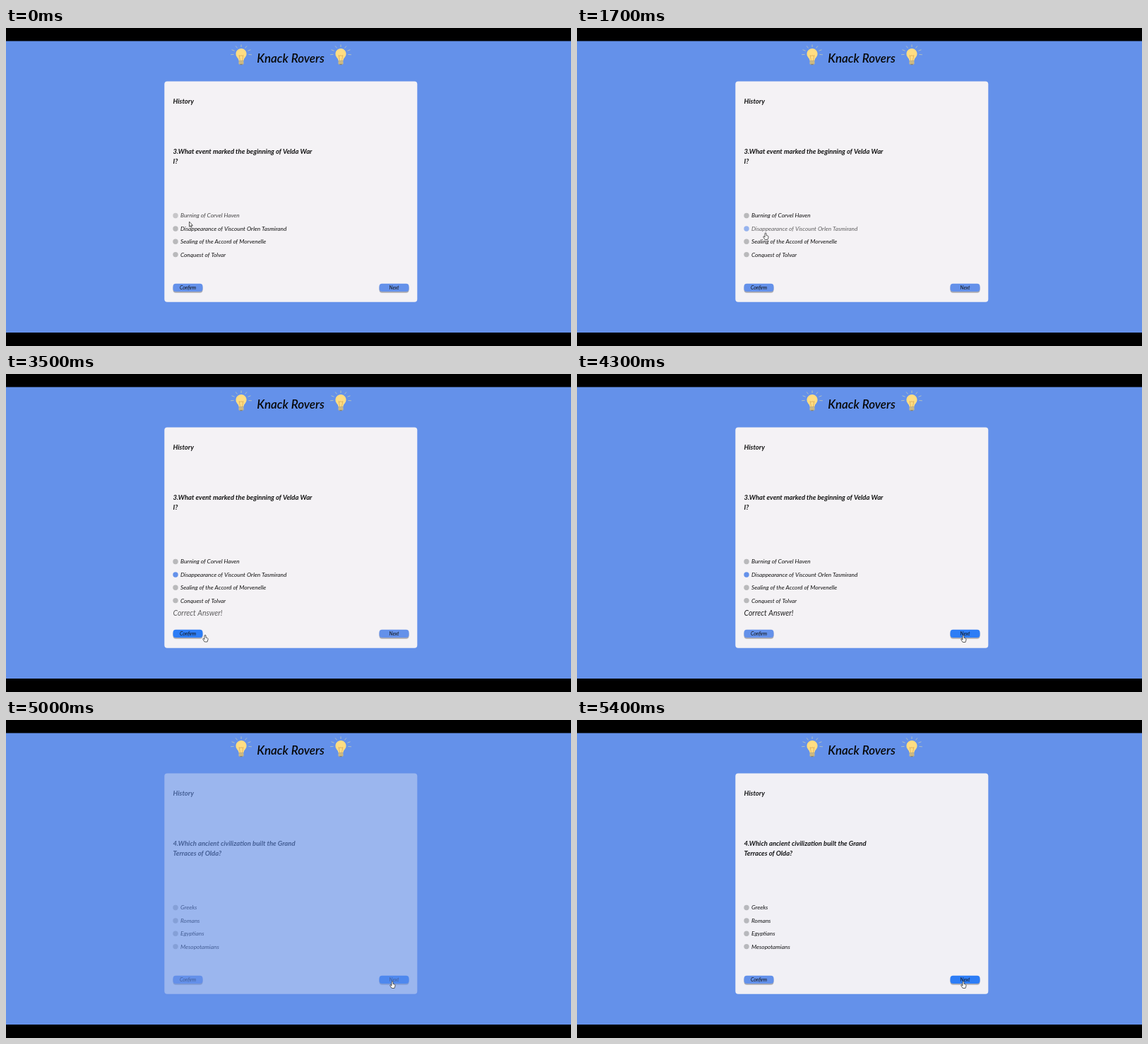
These frames come from a looping animation (800x450 px, 5.5 s). An HTML page with a canvas:

```html
<!DOCTYPE html>
<html lang="en">
<head>
<meta charset="utf-8">
<title>Quiz</title>
<style>
  html, body { margin: 0; width: 100%; height: 100%; overflow: hidden; background: #000; }
  canvas { display: block; width: 800px; height: 450px; }
</style>
</head>
<body>
<canvas id="stage"></canvas>
<script>
const LOOP = 5500;
const SWAP = 4550;
const SELECT = 1000;
const FACE = 'Lato, "Open Sans", sans-serif';
const BLUE = '#6491ea';
const BRIGHT = '#2d7df6';
const ROWS = [265.5, 284, 302.2, 320.6];

const QUESTIONS = [
  {
    lines: ['3.What event marked the beginning of Velda War', 'I?'],
    options: [
      'Burning of Corvel Haven',
      'Disappearance of Viscount Orlen Tasmirand',
      'Sealing of the Accord of Morvenelle',
      'Conquest of Tolvar'
    ]
  },
  {
    lines: ['4.Which ancient civilization built the Grand', 'Terraces of Olda?'],
    options: ['Greeks', 'Romans', 'Egyptians', 'Mesopotamians']
  }
];

const BUTTONS = [
  { label: 'Confirm', x: 236.5, press: [2740, 2900] },
  { label: 'Next', x: 528.5, press: [4430, SWAP] }
];

// Pointer stops: time, x, y
const PATH = [
  [0, 259.5, 274],
  [900, 267, 289.5],
  [1700, 267, 289.5],
  [2700, 264, 370.5],
  [3100, 264, 370.5],
  [3500, 282, 369],
  [4250, 547, 369.5],
  [LOOP, 547, 369.5]
];

const canvas = document.getElementById('stage');
const ctx = canvas.getContext('2d');
const ratio = window.devicePixelRatio || 1;
canvas.width = 800 * ratio;
canvas.height = 450 * ratio;

const clamp = v => Math.max(0, Math.min(1, v));
const smooth = v => { v = clamp(v); return v * v * (3 - 2 * v); };
const ramp = (t, from, to) => smooth((t - from) / (to - from));

function pointerAt(t) {
  const i = PATH.findIndex(p => p[0] > t);
  const [t0, x0, y0] = PATH[i - 1];
  const [t1, x1, y1] = PATH[i];
  const k = ramp(t, t0, t1);
  return { x: x0 + (x1 - x0) * k, y: y0 + (y1 - y0) * k };
}

function rect(x, y, w, h, color) {
  ctx.fillStyle = color;
  ctx.fillRect(x, y, w, h);
}

function box(x, y, w, h, r, color) {
  ctx.fillStyle = color;
  ctx.beginPath();
  ctx.roundRect(x, y, w, h, r);
  ctx.fill();
}

function disc(x, y, r, color) {
  ctx.fillStyle = color;
  ctx.beginPath();
  ctx.arc(x, y, r, 0, Math.PI * 2);
  ctx.fill();
}

function text(str, x, y, size, weight = 400, color = '#111', align = 'left') {
  ctx.font = `italic ${weight} ${size}px ${FACE}`;
  ctx.textAlign = align;
  ctx.fillStyle = color;
  ctx.fillText(str, x, y);
}

function line(points, color, width) {
  ctx.strokeStyle = color;
  ctx.lineWidth = width;
  ctx.beginPath();
  points.forEach(([x, y]) => ctx.lineTo(x, y));
  ctx.stroke();
}

function bulb(x) {
  ctx.save();
  ctx.translate(x, 36.5);
  for (let i = 0; i < 7; i++) {
    const a = Math.PI * (-1.03 + i * 0.177);
    const c = Math.cos(a), s = Math.sin(a);
    line([[c * 10.5, s * 9.5], [c * 15, s * 13]], '#c3c9b4', 0.8);
  }
  ctx.fillStyle = '#ffdd82';
  ctx.beginPath();
  ctx.arc(0, 0, 7.6, Math.PI * 0.78, Math.PI * 0.22);
  ctx.bezierCurveTo(3.8, 7, 3.7, 8, 3.4, 10);
  ctx.lineTo(-3.4, 10);
  ctx.bezierCurveTo(-3.7, 8, -3.8, 7, -5.9, 4.9);
  ctx.fill();
  line([[-1.4, 9.5], [-3, 2], [-1.2, 3.4], [0, 1.8], [1.2, 3.4], [3, 2], [1.4, 9.5]], '#d9a552', 0.7);
  box(-3.4, 10, 6.8, 5, 1.2, '#e4ce91');
  for (const y of [10.6, 12.5, 14.4]) line([[-3.2, y], [3.2, y - 0.4]], '#a49468', 0.7);
  box(-1.8, 14.6, 3.6, 1.2, 0.6, '#8b8671');
  ctx.restore();
}

function button(b, t, p) {
  const pressed = t >= b.press[0] && t < b.press[1];
  const over = p.x > b.x && p.x < b.x + 47 && p.y > 360 && p.y < 376;
  const y = pressed ? 362.7 : 361.7;
  box(b.x, y + 1.8, 42, 11.2, 4, pressed ? '#777b88' : '#aaaab2');
  box(b.x, y, 42, 11.2, 4, over && !pressed ? BRIGHT : BLUE);
  text(b.label, b.x + 21, y + 8, 7, 400, '#111', 'center');
  return over;
}

function option(label, y, chosen, p) {
  const inside = p.x > 236 && p.x < 420;
  const hover = inside ? clamp((9.5 - Math.abs(p.y - y)) / 1.5) : 0;
  ctx.globalAlpha = 1 - 0.35 * hover;
  disc(240, y, 3.7, chosen ? BLUE : '#b9b9bb');
  text(label, 247, y + 2.9, 8.3);
  ctx.globalAlpha = 1;
  return hover > 0.8;
}

// Draws the card and tells whether the pointer is over a control.
function card(t, p) {
  const first = t < SWAP;
  const q = QUESTIONS[first ? 0 : 1];
  let over = false;
  box(224.3, 75.5, 358, 312.3, 4, '#f4f2f5');
  text('History', 236.5, 106.5, 9.5, 700);
  q.lines.forEach((s, i) => text(s, 236.5, 178 + i * 13.5, 9.5, 700));
  q.options.forEach((s, i) => {
    const chosen = first && i === 1 && t >= SELECT;
    over = option(s, ROWS[i], chosen, p) || over;
  });
  if (first && t >= 2900) {
    ctx.globalAlpha = 0.7 * ramp(t, 2900, 3500) + 0.3 * ramp(t, 3500, 3900);
    text('Correct Answer!', 236.5, 342, 10.5, 400, '#222');
    ctx.globalAlpha = 1;
  }
  BUTTONS.forEach(b => { over = button(b, t, p) || over; });
  return over;
}

function pointer(p, hand) {
  ctx.save();
  ctx.translate(p.x, p.y);
  ctx.lineJoin = 'round';
  ctx.lineWidth = 0.8;
  ctx.strokeStyle = '#333';
  ctx.fillStyle = '#fff';
  const shape = hand
    ? 'M-1 6.6V1Q0-.4 1 1V4L3.2 4.6Q4.2 5 4 6.6L3 10H-.8L-3.2 6.4Q-3-.0-2.4 5.2Z'.replace('Q-3-.0-2.4 5.2', 'Q-3 4.9-2.2 5.2')
    : 'M0 0V7.2L1.6 5.8L2.7 8.2L3.7 7.7L2.7 5.4H4.9Z';
  const path = new Path2D(shape);
  ctx.fill(path);
  ctx.stroke(path);
  ctx.restore();
}

function draw(t) {
  const p = pointerAt(t);
  ctx.setTransform(ratio, 0, 0, ratio, 0, 0);
  rect(0, 0, 800, 450, '#000');
  rect(0, 18.5, 800, 412.5, BLUE);
  bulb(333);
  bulb(474);
  text('Knack Rovers', 403, 49, 17, 600, '#080808', 'center');

  const over = card(t, p);
  if (t >= SWAP) {
    // Veil the finished card so it fades in as one group.
    ctx.globalAlpha = 1 - ramp(t, 4660, 5460);
    rect(223, 74, 361, 316, BLUE);
    ctx.globalAlpha = 1;
  }
  pointer(p, over);
}

function tick() {
  draw(performance.now() % LOOP);
  requestAnimationFrame(tick);
}
tick();
</script>
</body>
</html>
```
